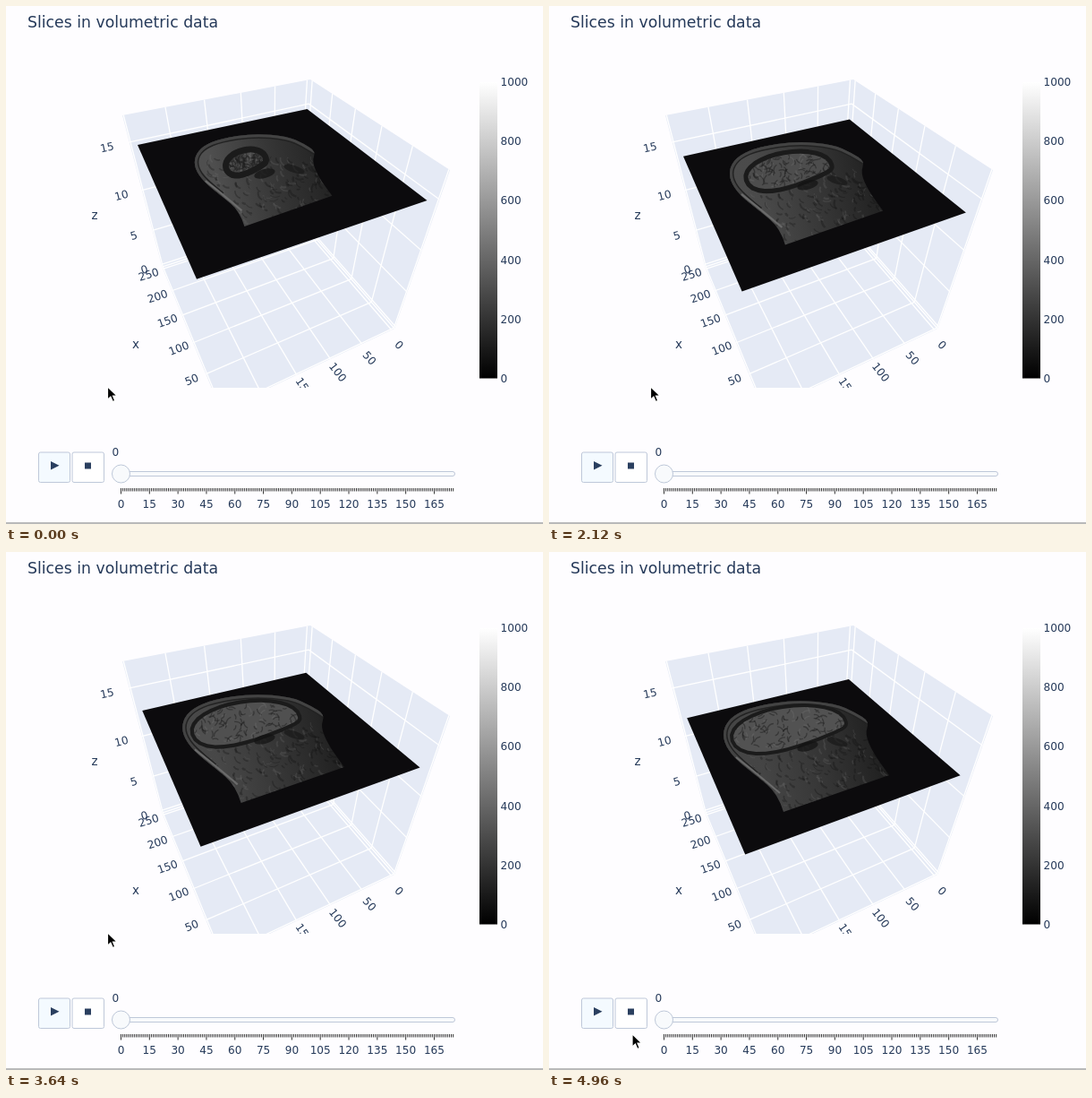
An HTML page with a canvas for the animation above (5000 ms loop, 600 by 578 pixels).

```html
<!DOCTYPE html>
<html lang="en">
<head>
<meta charset="utf-8">
<title>Slices in volumetric data</title>
<style>
  html, body { margin: 0; width: 100%; height: 100%; overflow: hidden; background: #fefdff; }
  svg, canvas { position: absolute; left: 0; top: 0; display: block; }
  text { font-family: "DejaVu Sans", Verdana, sans-serif; font-size: 12.1px; fill: #263a5a; }
  .title { font-size: 17.3px; }
  .axis { font-size: 13.5px; }
  .mid { text-anchor: middle; }
  .face { fill: #e5eaf5; }
  .grid { fill: none; stroke: #fff; stroke-width: 1.3; }
  .frame { stroke: #bec8d9; stroke-width: 1; }
</style>
</head>
<body>
<svg width="600" height="578" viewBox="0 0 600 578">
  <defs>
    <clipPath id="scene"><rect width="520" height="426"/></clipPath>
    <linearGradient id="gray" x1="0" y1="0" x2="0" y2="1">
      <stop offset="0" stop-color="#fff"/><stop offset="1" stop-color="#000"/>
    </linearGradient>
  </defs>
  <text class="title" x="24" y="24">Slices in volumetric data</text>
  <g id="box" clip-path="url(#scene)"></g>
  <rect x="529" y="85" width="20" height="330.5" fill="url(#gray)"/>
  <g id="bar"></g>
  <rect class="frame" x="36.5" y="498" width="35" height="33.5" rx="2" fill="#f4faff"/>
  <rect class="frame" x="74" y="498" width="35.5" height="33.5" rx="2" fill="#fff"/>
  <path d="M50 508L59.5 512.8L50 517.6Z" fill="#2a3f5f"/>
  <rect x="88" y="509.5" width="7" height="7" fill="#2a3f5f"/>
  <text x="118.5" y="502">0</text>
  <rect class="frame" x="126" y="519.5" width="375.5" height="5" rx="2.5" fill="#f8fafc"/>
  <circle class="frame" cx="128.5" cy="522" r="10" fill="#f8fafc"/>
  <g id="ticks"></g>
  <rect y="576.5" width="600" height="1" fill="#777"/>
</svg>
<canvas id="slice" width="600" height="578"></canvas>
<svg id="cursor" width="20" height="24" viewBox="-3 -3 20 24">
  <path d="M0 0V14.5L3.4 11.4L5.8 16.8L8.3 15.7L6 10.4H10.6Z" fill="#000" stroke="#fff" stroke-width="1.2"/>
</svg>
<script>
const byId = id => document.getElementById(id);
const mix = (a, b, t) => a.map((n, i) => n + (b[i] - n) * t);

function add(parent, name, attrs, content) {
  const el = document.createElementNS('http://www.w3.org/2000/svg', name);
  for (const key in attrs) el.setAttribute(key, attrs[key]);
  if (content !== undefined) el.textContent = content;
  parent.append(el);
}

function random(seed) {
  return () => (seed = (seed * 16807) % 2147483647) / 2147483647;
}

// Homogeneous corners of the box top; DOWN is the vanishing point of the z axis.
const weigh = (x, y, w) => [x * w, y * w, w];
const BACK = weigh(340, 82, 3.25), LEFT = weigh(130, 122, 2.745), RIGHT = weigh(496, 183, 2.232);
const DOWN = [296, 755, 1];

function project(u, v, s) {
  const [x, y, w] = BACK.map((b, i) => b + u * (LEFT[i] - b) + v * (RIGHT[i] - b) + s * DOWN[i]);
  return [x / w, y / w];
}

function drawBox() {
  const box = byId('box');
  const face = [[1, 0, 0], [0, 0, 0], [0, 1, 0], [0, 1, 1], [1, 1, 1], [1, 0, 1]];
  add(box, 'path', { class: 'face', d: 'M' + face.map(p => project(...p)).join('L') + 'Z' });

  let d = '';
  const line = (a, b) => { d += 'M' + project(...a) + 'L' + project(...b); };
  const label = (content, [x, y], dx, dy, turn) =>
    add(box, 'text', { class: 'mid', y: 4.4, transform: `translate(${x + dx} ${y + dy}) rotate(${turn})` }, content);

  for (let i = 0; i < 6; i++) {
    const t = 0.02 + 0.195 * i;
    line([t, 0, 0], [t, 0, 1]);
    line([0, t, 0], [0, t, 1]);
    line([t, 0, 1], [t, 1, 1]);
    line([0, t, 1], [1, t, 1]);
    label(250 - 50 * i, project(1, t, 1), -16, 6, -17 - 1.3 * i);
    label(50 * i, project(t, 1, 1), 8.5, 16.5 - i, 45 + 3.5 * i);
  }
  for (let i = 0; i < 4; i++) {
    const s = 0.1365 + 0.281 * i;
    line([0, 0, s], [1, 0, s]);
    line([0, 0, s], [0, 1, s]);
    label(15 - 5 * i, project(1, 0, s), -25 + 2 * i, 5.5, -12 - 2 * i);
  }
  line([0, 0, 1], [1, 0, 1]);
  line([0, 0, 1], [0, 1, 1]);
  add(box, 'path', { class: 'grid', d });
  add(box, 'text', { class: 'mid axis', x: 99, y: 238 }, 'z');
  add(box, 'text', { class: 'mid axis', x: 145, y: 382 }, 'x');
}

function drawScales() {
  for (let i = 0; i <= 5; i++)
    add(byId('bar'), 'text', { x: 552.5, y: 419.7 - 66.1 * i }, 200 * i);
  let d = '';
  for (let i = 0; i <= 175; i++) {
    const x = 128.5 + 2.121 * i;
    d += `M${x} 538V${i % 15 ? 541.5 : 544.5}`;
    if (i % 15 === 0) add(byId('ticks'), 'text', { class: 'mid', x, y: 560 }, i);
  }
  add(byId('ticks'), 'path', { d, stroke: '#333', 'stroke-width': 1 });
}

const LAST = 26;
const PLANE = [
  [[147, 155], [154.2, 185.2]], [[336.5, 115], [334.9, 142]],
  [[470.5, 217], [459.6, 249.2]], [[213, 304.7], [219.2, 337.5]]
];
// Head outline on the last slice, from the nape over the crown to the front.
const HEAD = [[262, 290], [256, 270], [231, 249], [207, 230], [195, 212], [195, 196], [206, 182], [230, 172],
              [275, 165], [320, 169], [342, 179], [358, 189], [353, 203], [362, 224], [380, 249]];

const ctx = byId('slice').getContext('2d');

function smooth(points, close) {
  const path = new Path2D();
  path.moveTo(...points[0]);
  for (let i = 1; i < points.length - 1; i++)
    path.quadraticCurveTo(...points[i], ...mix(points[i], points[i + 1], 0.5));
  path.lineTo(...points[points.length - 1]);
  if (close) path.closePath();
  return path;
}

function stroke(path, color, width) {
  ctx.strokeStyle = color;
  ctx.lineWidth = width;
  ctx.stroke(path);
}

function blob(x, y, rx, ry, turn, color) {
  ctx.fillStyle = color;
  ctx.beginPath();
  ctx.ellipse(x, y, rx, ry, turn, 0, 7);
  ctx.fill();
}

// A short curved stroke centred on x, y
function curl(x, y, len, turn, color, width) {
  const dx = Math.cos(turn) * len / 2, dy = Math.sin(turn) * len / 2;
  const path = new Path2D();
  path.moveTo(x - dx, y - dy);
  path.quadraticCurveTo(x - dy * 0.7, y + dx * 0.6, x + dx, y + dy);
  stroke(path, color, width);
}

function drawTissue(p, lift) {
  const rnd = random(77);
  for (let i = 0; i < 240; i++) {
    const turn = 0.75 + (rnd() - 0.5) * 1.6 + Math.sin(p * 8 + i) * 0.3;
    curl(225 + rnd() * 155, 200 + rnd() * 85 - lift, 3 + rnd() * 8, turn,
         i % 3 ? 'rgba(12,12,12,.28)' : 'rgba(120,120,120,.22)', 0.8 + rnd() * 1.6);
  }
}

function drawBrain(p) {
  const grow = Math.sin(p * Math.PI / 2);
  const cx = 268, cy = 175 + 24 * p, rx = 19 + 43 * grow, ry = 11 + 14 * grow;
  const brain = new Path2D();
  for (let a = 0; a < 6.28; a += 0.2) {
    const c = Math.cos(a), s = Math.sin(a);
    brain.lineTo(cx + rx * c, cy + ry * (s * (s > 0 ? 0.75 - 0.4 * c : 1) - 0.28 * c));
  }
  brain.closePath();
  ctx.lineJoin = 'round';
  stroke(brain, '#1b1b1b', 14 - 6 * grow);
  ctx.fillStyle = `hsl(0 0% ${27 + 5 * grow}%)`;
  ctx.fill(brain);
  ctx.save();
  ctx.clip(brain);
  const rnd = random(4021);
  for (let i = 0; i < 120; i++) {
    const x = cx + (rnd() * 2 - 1) * rx, y = cy + (rnd() * 2 - 1) * ry;
    curl(x, y, 4 + rnd() * 6, rnd() * 6.3 + p, i % 4 ? 'rgba(30,30,30,.5)' : 'rgba(120,120,120,.3)', 1.3);
  }
  ctx.restore();
}

function drawHead(p) {
  const lift = 30 * (1 - p);
  const scale = 1 - 0.17 * (1 - p) ** 1.5;
  const points = HEAD.map(([x, y]) => [288 + (x - 288) * scale, 207 - lift + (y - 207) * scale]);
  ctx.save();
  ctx.clip(smooth(points, true));

  const tone = ctx.createLinearGradient(240, 255 - lift, 375, 225 - lift);
  tone.addColorStop(0, `hsl(0 0% ${31 - 4 * p}%)`);
  tone.addColorStop(0.5, '#353535');
  tone.addColorStop(1, '#1f1f1f');
  ctx.fillStyle = tone;
  ctx.fillRect(180, 120, 220, 190);
  drawTissue(p, lift);

  const scalp = smooth(points.slice(2, 12));
  stroke(scalp, '#222', 9);
  stroke(scalp, '#434343', 6);
  drawBrain(p);
  blob(289, 217 - lift, 12, 5, -0.25, 'rgba(18,18,18,.7)');
  blob(322, 212 - lift, 12, 4, 0.3, 'rgba(20,20,20,.6)');

  // Bright layer along the back of the neck
  const inset = points.slice(1, 4).map(([x, y]) => [x + 2, y - 1]);
  stroke(smooth(inset), '#6a6a6a', 2.2);
  ctx.restore();
}

function drawSlice(k) {
  const p = k / LAST;
  const plane = new Path2D();
  PLANE.forEach(([from, to]) => plane.lineTo(...mix(from, to, p)));
  ctx.clearRect(0, 0, 600, 578);
  ctx.fillStyle = '#0c0b0d';
  ctx.fill(plane);
  drawHead(p);
}

// Slices follow each other about every 193 ms, on a 40 ms raster.
const startOf = i => 40 * Math.round((128 + 193.3 * i + 65 * Math.sin(Math.PI * i / 25)) / 40);

function sliceAt(t) {
  let k = 0;
  while (k < LAST && startOf(k) <= t) k++;
  return k;
}

let shown = -1;

function tick() {
  const t = performance.now() % 5000;
  const k = sliceAt(t);
  if (k !== shown) drawSlice(shown = k);
  const p = Math.min(1, Math.max(0, (Math.floor(t / 40) * 40 - 4600) / 360));
  const ease = p * p * (3 - 2 * p);
  byId('cursor').style.transform = `translate(${110.5 - 20.5 * ease}px, ${421.7 + 113 * ease}px)`;
  requestAnimationFrame(tick);
}

drawBox();
drawScales();
tick();
</script>
</body>
</html>
```
